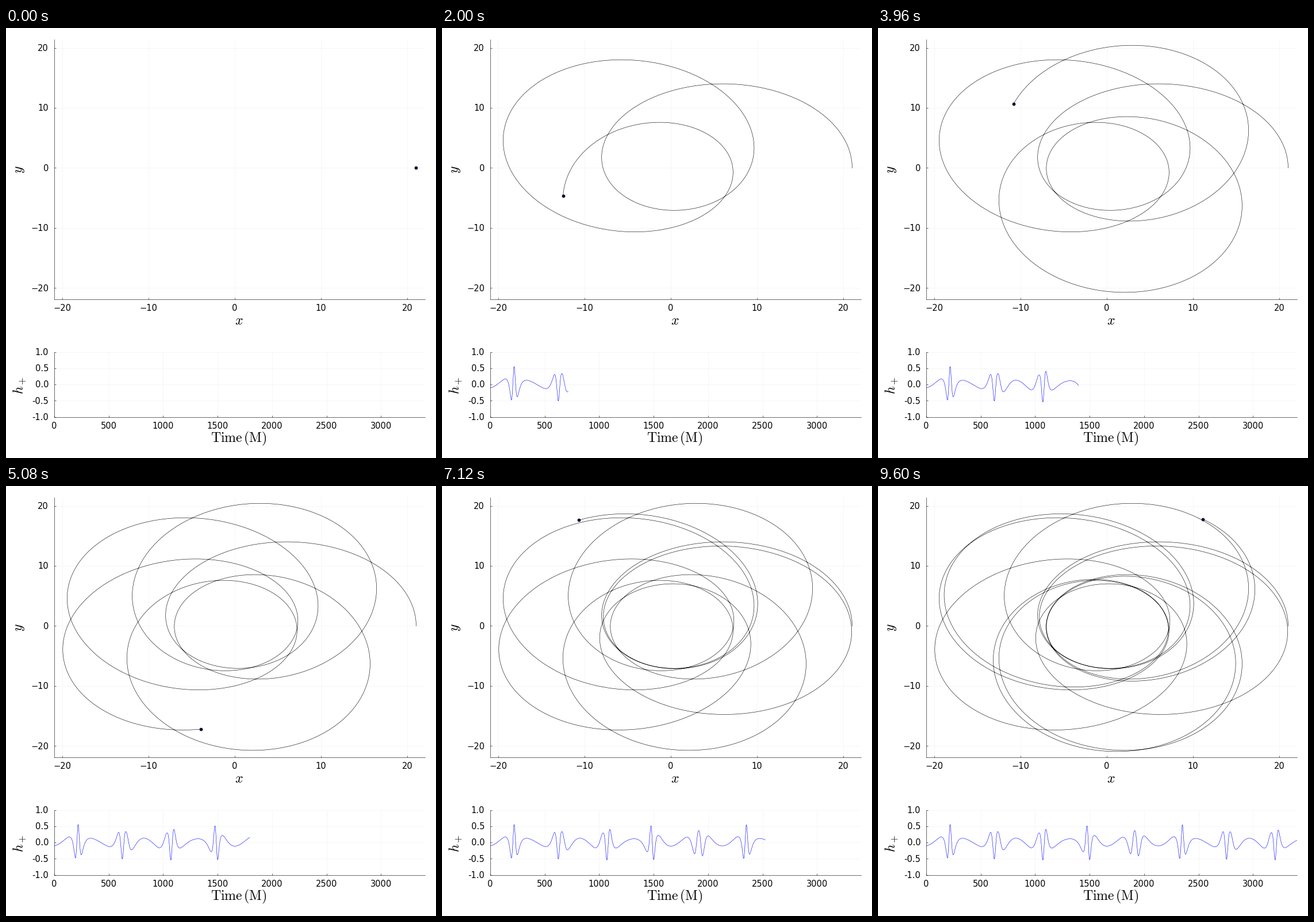
A matplotlib script for the animation above (9.64 s loop, 748 by 748 pixels).

```python
import numpy as np
import matplotlib.pyplot as plt
from matplotlib.animation import FuncAnimation

SIZE, DPI = 748, 100
PX = 72 / DPI                      # points per pixel
FRAMES, SUB = 241, 20              # SUB curve samples per frame
DTAU = 12.5                        # proper time per frame
SPIN, P, ECC = 0.4, 10.5, 0.5      # black hole spin, semi-latus rectum, eccentricity
THETA = np.pi / 4                  # viewing angle
THIN = 0.58 * PX                   # weight of curves and axis lines

plt.rcParams["font.family"] = "DejaVu Sans"
plt.rcParams["mathtext.fontset"] = "cm"


def integrate(rate, s):
    steps = (rate[1:] + rate[:-1]) / 2 * np.diff(s)
    return np.concatenate(([0], np.cumsum(steps)))


def constants():
    """Energy and L - aE of a prograde equatorial Kerr orbit."""
    a2, e2 = SPIN**2, ECC**2
    f = (P**3 - 2 * (3 + e2) * P**2 + (3 + e2)**2 * P - 4 * a2 * (1 - e2)**2) / P**3
    n = 2 / P * (-P**2 + (3 + e2 - a2) * P - a2 * (1 + 3 * e2))
    c = (a2 - P)**2
    x2 = (-n - np.sqrt(n * n - 4 * f * c)) / (2 * f)
    energy = np.sqrt(1 - (1 - e2) / P * (1 - x2 / P**2 * (1 - e2)))
    return energy, np.sqrt(x2)


def orbit():
    """Proper time, time, position along the geodesic, starting at apastron."""
    energy, k = constants()
    chi = np.linspace(0.9 * np.pi, 17.4 * np.pi, 24001)
    u = 1 + ECC * np.cos(chi)
    r = P / u
    root = np.sqrt(k**2 + SPIN**2 + 2 * SPIN * k * energy - 2 * k**2 / P * (2 + u))
    delta = 1 - 2 / r + (SPIN / r)**2
    t_rate = (SPIN**2 * energy - 2 * SPIN * k / r + energy * r**2) / (delta * root)
    phi_rate = (k + SPIN * energy - 2 * k / r) / (delta * root)
    tau, t, phi = (integrate(q, chi) for q in (r**2 / root, t_rate, phi_rate))
    tau, t, phi = (q - np.interp(np.pi, chi, q) for q in (tau, t, phi))
    return tau, t, r * np.cos(phi), r * np.sin(phi)


def strain(t, x, y):
    """Plus polarisation from quadrupole, octupole and current quadrupole."""
    vx, vy = np.gradient(x, t), np.gradient(y, t)
    n = np.sin(THETA)
    xx = x**2 + n * x**2 * vx
    yy = y**2 + n * y * (2 * x * vy - y * vx)
    moment = np.cos(THETA)**2 * xx - yy
    return np.gradient(np.gradient(moment, t), t)


tau, t, x, y = orbit()
h = strain(t, x, y)
samples = np.linspace(0, DTAU * (FRAMES - 1), SUB * (FRAMES - 1) + 1)
t, x, y, h = (np.interp(samples, tau, q) for q in (t, x, y, h))

fig = plt.figure(figsize=(SIZE / DPI, SIZE / DPI), dpi=DPI, facecolor="white")


def text(px, py, s, size, **kw):
    fig.text(px / SIZE, 1 - py / SIZE, s, fontsize=size * PX, color="black", **kw)


def panel(top, bottom, xlim, ylim, xticks, yticks, xnames, ynames):
    left, right = 84, 728.5
    ax = fig.add_axes([left / SIZE, 1 - bottom / SIZE,
                       (right - left) / SIZE, (bottom - top) / SIZE])
    ax.set(xlim=xlim, ylim=ylim, xticks=xticks, yticks=yticks)
    ax.tick_params(direction="in", length=3 * PX, width=THIN,
                   labelleft=False, labelbottom=False)
    ax.set_axisbelow(True)
    ax.grid(color="#f1f1f1", linewidth=THIN)
    for side, spine in ax.spines.items():
        spine.set_visible(side in ("left", "bottom"))
        spine.set_linewidth(THIN)
    for v, name in zip(xticks, xnames):
        px = left + (v - xlim[0]) / (xlim[1] - xlim[0]) * (right - left)
        text(px, bottom + 20, name, 14.6, ha="center", va="baseline")
    for v, name in zip(yticks, ynames):
        py = bottom - (v - ylim[0]) / (ylim[1] - ylim[0]) * (bottom - top)
        text(74, py + 5.4, name, 14.6, ha="right", va="baseline")
    return ax


tens = range(-20, 21, 10)
tens_names = [str(v).replace("-", "\u2212") for v in tens]
halves = np.arange(-1, 1.1, 0.5)
times = range(0, 3001, 500)

plane = panel(20, 472.4, (-20.9, 22.0), (-21.92, 21.4),
              tens, tens, tens_names, tens_names)
wave = panel(563.5, 676.6, (0, t[-1]), (-1, 1), times, halves,
             [str(v) for v in times], [f"{v:.1f}" for v in halves])

mid = dict(ha="center", va="center")
text(405, 508.5, "$x$", 23.8, **mid)
text(23, 246, "$y$", 23.8, rotation=90, **mid)
text(405.3, 714, r"$\mathrm{Time\,(M)}$", 23.8, **mid)
text(24.5, 622, "$h_+$", 23.8, rotation=90, **mid)

path, = plane.plot([], [], color="black", linewidth=THIN)
body, = plane.plot([], [], "o", markersize=4.6 * PX, markerfacecolor="#000058",
                   markeredgecolor="#030310", markeredgewidth=1.1 * PX)
signal, = wave.plot([], [], color="blue", linewidth=THIN)


def update(frame):
    end = frame * SUB + 1
    path.set_data(x[:end], y[:end])
    body.set_data(x[end - 1:end], y[end - 1:end])
    signal.set_data(t[:end], h[:end])
    return path, body, signal


anim = FuncAnimation(fig, update, frames=FRAMES, interval=40,
                     repeat=True, repeat_delay=0)
plt.show()
```
